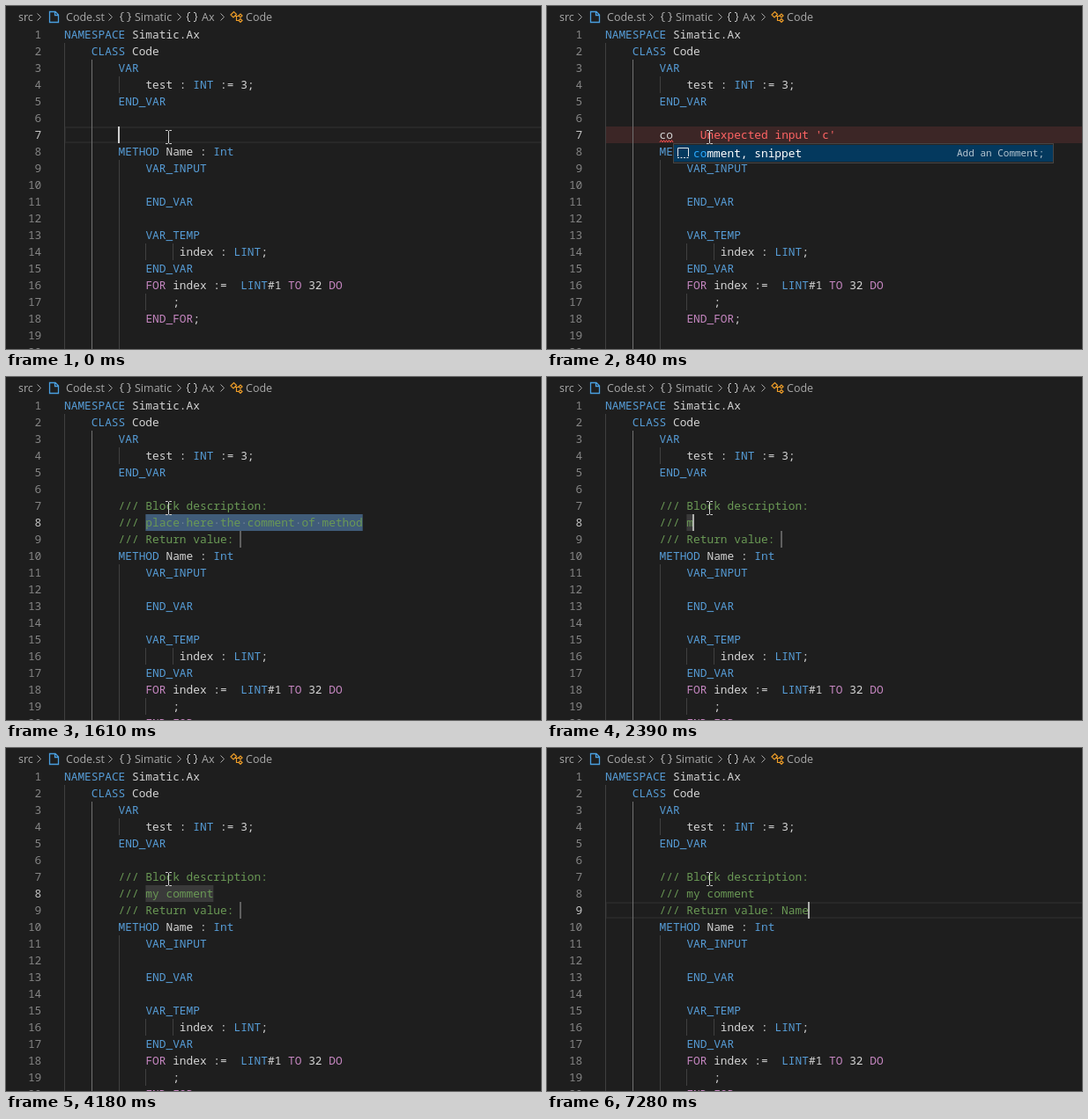
Recreate the animation shown at these times as an HTML page. Size 607x390 px, loop 7.73 s.

```html
<!DOCTYPE html>
<html lang="en">
<head>
<meta charset="utf-8">
<title>Comment snippet</title>
<style>
html, body { margin: 0; width: 100%; height: 100%; overflow: hidden; background: #1e1e1e; }
svg { display: block; }
text { white-space: pre; }
.code { font: 12.83px "Noto Sans Mono", "DejaVu Sans Mono", monospace; }
.note { font: 11px "Noto Sans Mono", "DejaVu Sans Mono", monospace; }
.crumb { font: 12.5px "Open Sans", "Noto Sans", sans-serif; fill: #a9a9a9; }
</style>
</head>
<body>
<svg width="607" height="390" viewBox="0 0 607 390">
  <g id="crumbs"></g>
  <g id="editor"></g>
  <g fill="none" stroke="#d0d0d0">
    <path d="M181 141.5h2.5l1 1 1-1h2.5M184.500 142v14M181 156.500h2.500l1-1 1 1h2.500"/>
  </g>
</svg>
<script>
const LOOP = 7730, CH = 7.698, ROW = 19, LEFT = 66, TOP = 23;
const BLUE = '#569cd6', PINK = '#c586c0', PLAIN = '#d4d4d4', GREEN = '#6a9955', RED = '#ff6464';

const colX = c => LEFT + c * CH;
const rowY = n => TOP + (n - 1) * ROW;
const esc = s => s.replace(/&/g, '&amp;').replace(/</g, '&lt;');
const rect = (x, y, w, h, fill, extra = '') =>
  `<rect x="${x}" y="${y}" width="${w}" height="${h}" fill="${fill}" ${extra}/>`;
const text = (x, y, s, fill, cls = 'code', extra = '') =>
  `<text x="${x}" y="${y}" class="${cls}" fill="${fill}" ${extra}>${esc(s)}</text>`;

const HEAD = ['NAMESPACE Simatic.Ax', '    CLASS Code', '        VAR',
  '            test : INT := 3;', '        END_VAR', ''];
const BODY = ['        METHOD Name : Int', '            VAR_INPUT', '', '            END_VAR', '',
  '            VAR_TEMP', '                 index : LINT;', '            END_VAR',
  '            FOR index :=  LINT#1 TO 32 DO', '                ;', '            END_FOR;', '', ''];
const PAD = ' '.repeat(8);
const WORDS = /\b(NAMESPACE|CLASS|VAR_INPUT|VAR_TEMP|END_VAR|VAR|METHOD|INT|Int|LINT|FOR|END_FOR|TO|DO)\b/;
const FLOW = /^(FOR|END_FOR|TO|DO)$/;

function codeLine(n, s, fill) {
  let col = 0, out = '';
  for (const part of fill ? [s] : s.split(WORDS)) {
    const lead = part.length - part.trimStart().length;
    const color = fill || (!WORDS.test(part) ? PLAIN : FLOW.test(part) ? PINK : BLUE);
    if (part.trim()) out += text(colX(col + lead), rowY(n) + 14, part.trim(), color);
    col += part.length;
  }
  return out;
}

// Text typed so far, given [time, length] steps
const typed = (s, steps, t) => s.slice(0, steps.reduce((n, [at, len]) => t >= at ? len : n, 0));
const within = (t, a, b) => t >= a && t < b;

const CALL = [[70, 1], [300, 2]];
const NOTE = [[2390, 1], [2540, 2], [2620, 3], [2850, 4], [3000, 5], [3230, 6], [3310, 7],
  [3460, 8], [3550, 9], [3630, 10]];
const RESULT = [[5870, 1], [6020, 3], [6250, 4]];
const BLINKS = [[840, 1070], [1610, 2070], [4180, 4640], [5330, 5790], [6710, 7190]];
const HINT = 'place here the comment of method';

function guides(first) {
  const bar = (x, a, b, fill = '#404040') => rect(x, rowY(a), 1, (b - a) * ROW, fill);
  return bar(66, 2, 21) + bar(97, 3, 21, '#707070') + bar(128, 4, 5) + bar(128, first + 1, 21) +
    bar(158, first + 6, first + 7) + bar(189, first + 6, first + 7) + bar(158, first + 9, first + 10);
}

function squiggle(y) {
  let d = `M128 ${y}`;
  for (let i = 0; i < 5; i++) d += 'l1.500 -2.500l1.500 2.500';
  return `<path d="${d}" fill="none" stroke="#f14c4c"/>`;
}

function popup(x, y, match, names) {
  const h = names.length * ROW + 4;
  let out = rect(x + .5, y + .5, 431, h - 1, '#252526', 'stroke="#454545"') +
    rect(x + 1, y + 2, 430, ROW, '#04395e');
  names.forEach((name, i) => {
    const top = y + 2 + i * ROW, base = top + 14;
    out += `<path d="M${x + 5.5} ${top + 13}v-9.500h12v9.500" fill="none" stroke="#e8e8e8"/>` +
      `<path d="M${x + 5} ${top + 14.5}h13" stroke="#e8e8e8" stroke-dasharray="2 1.500"/>` +
      text(x + 23, base, match, '#2aaaff', 'code', 'font-weight="600"') +
      text(x + 23 + match.length * CH, base, name.slice(match.length), '#fff');
  });
  return out + text(x + 322, y + 14.5, 'Add an Comment;', '#b4c4cf', 'note', 'font-weight="600"');
}

function scene(t) {
  const open = t >= 1070, first = open ? 10 : 8;
  const call = typed('co', CALL, t), note = typed('my comment', NOTE, t), result = typed('Name', RESULT, t);
  const picked = within(t, 1070, 2390), bad = within(t, 460, 1530);
  const active = !open ? 7 : t < 4870 ? 8 : 9;
  const seven = PAD + (open ? '/// Block description:' : call);
  const ink = !open || t < 1150 ? PLAIN : GREEN;
  let out = '';

  if (!open || t >= 4870)
    out += rect(67, rowY(active) + 1, 560, ROW - 2, 'none', 'stroke="#282828" stroke-width="2"');
  if (bad) out += rect(66, rowY(7), 541, ROW, '#3c2626');
  out += guides(first);

  for (let n = 1; n <= 20; n++) {
    const s = String(n);
    out += text(40.3 - s.length * CH, rowY(n) + 14, s, n === active ? '#c6c6c6' : '#858585');
  }
  HEAD.forEach((s, i) => out += codeLine(i + 1, s));
  out += codeLine(7, seven, ink);
  BODY.slice(0, 21 - first).forEach((s, i) => out += codeLine(first + i, s));

  let end = seven.length;
  if (open) {
    const body = picked ? HINT : note, start = colX(12);
    if (t < 7280) out += rect(start, rowY(8), body.length * CH, ROW, picked ? '#405c79' : '#3a3a3a');
    out += codeLine(8, PAD + '/// ' + body, ink) + codeLine(9, PAD + '/// Return value: ' + result, ink);
    if (picked) out += text(start, rowY(8) + 14, HINT.replace(/\S/g, ' ').replace(/ /g,
      (c, i) => HINT[i] === ' ' ? '·' : ' '), 'rgba(227,228,226,.3)');
    if (t < 4870) out += rect(265, rowY(9), 2, ROW, '#606060');
    end = active === 8 ? 12 + body.length : 26 + result.length;
  }
  if (bad) out += text(colX(seven.length + 4), rowY(7) + 14,
    `Unexpected input '${t < 920 ? 'c' : 'co'}'`, RED);
  if (within(t, 380, 1150)) out += squiggle(rowY(7) + 18);
  if (within(t, 150, 300)) out += popup(135, rowY(8), 'c', ['comment, snippet', 'class, snippet', 'case, snippet']);
  if (within(t, 300, 1070)) out += popup(143, rowY(8), 'co', ['comment, snippet']);
  if (!BLINKS.some(([a, b]) => within(t, a, b)))
    out += rect(Math.round(colX(end)) - 1, rowY(active), 2, ROW, active === 7 ? '#d0d0d0' : '#aeafad');
  return out;
}

function crumbs() {
  const word = (x, s) => `<text x="${x}" y="17" class="crumb">${s}</text>`;
  const chevron = x => `<path d="M${x - 2} 8.500l4 4-4 4" stroke="#a9a9a9"/>`;
  const braces = x => `<path d="M${x + 4.5} 7.500h-1q-1.500 0-1.500 1.500v2q0 1.500-1.500 1.500 1.500 0 1.500 1.500v2q0 1.500 1.500 1.500h1` +
    `M${x + 8.5} 7.500h1q1.500 0 1.500 1.500v2q0 1.500 1.500 1.500-1.500 0-1.500 1.500v2q0 1.500-1.500 1.500h-1" stroke="#c5c5c5"/>`;
  return `<g fill="none">` + [37.5, 118.5, 196.5, 245.5].map(chevron).join('') + braces(129) + braces(204.5) +
    `<path d="M49.500 6.500h6.500l3.500 3.500v8.500h-10zM55.500 6.500v4h4" stroke="#4a9fe0" stroke-width="1.300"/>` +
    `<path d="M255 10l3.500-3.500 3 3-3.500 3.500zM260 11.500h4M261.500 11.500v5h2.500M264 11l2-2 2 2-2 2zM264 16.500l2-2 2 2-2 2z" stroke="#ee9d28" stroke-width="1.200"/></g>` +
    word(14, 'src') + word(68, 'Code.st') + word(146, 'Simatic') + word(222, 'Ax') + word(272, 'Code');
}

const editor = document.getElementById('editor');
document.getElementById('crumbs').innerHTML = crumbs();
const began = performance.now();
let shown = '';
function draw() {
  const next = scene((performance.now() - began) % LOOP);
  if (next !== shown) editor.innerHTML = shown = next;
  requestAnimationFrame(draw);
}
draw();
</script>
</body>
</html>
```
